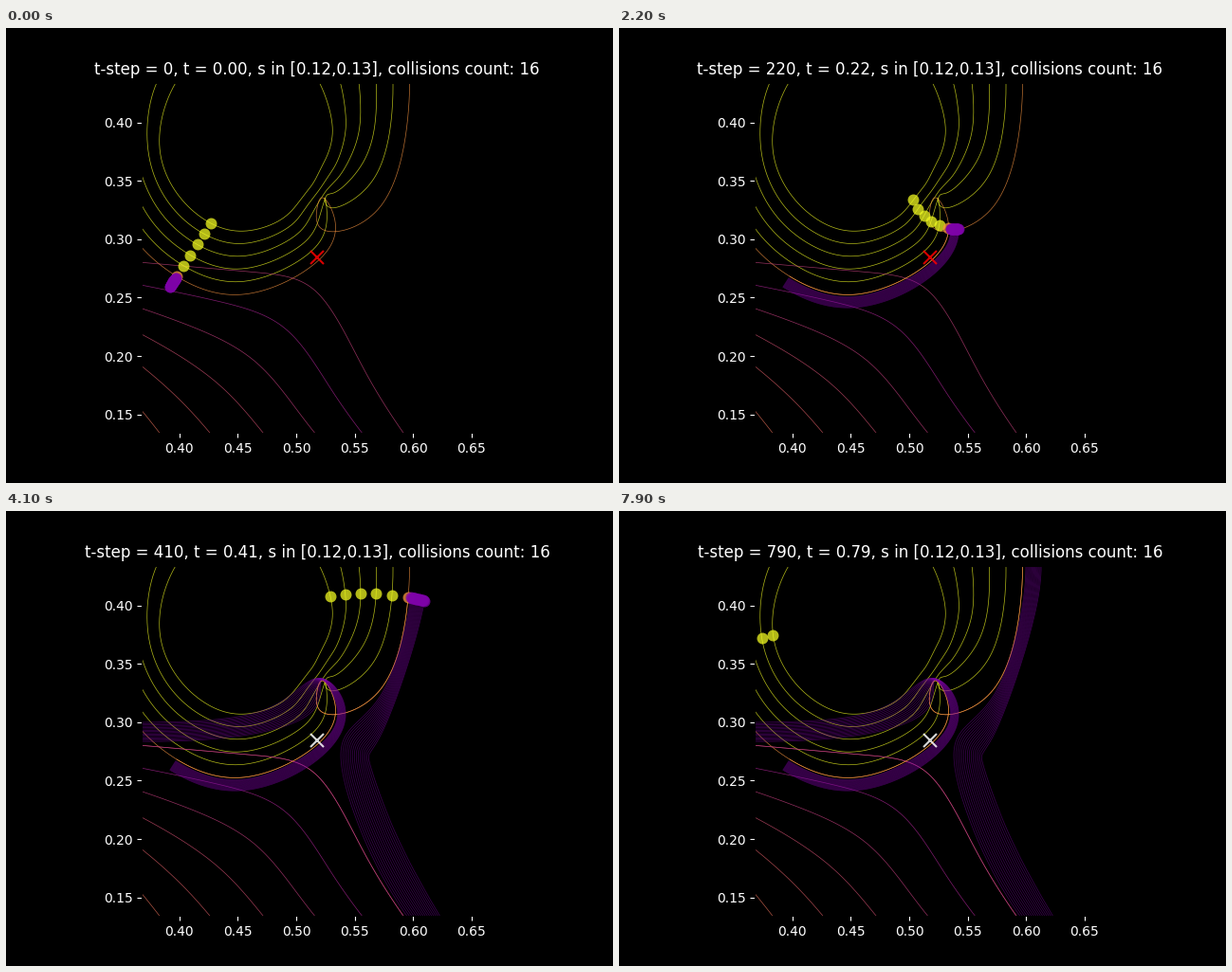
A matplotlib script for the animation above (8 s loop, 640 by 480 pixels).

```python
import numpy as np
import matplotlib.pyplot as plt
from matplotlib.animation import FuncAnimation

plt.style.use("dark_background")
plt.rcParams.update({"font.family": "DejaVu Sans", "axes.edgecolor": "black"})

FRAMES, INTERVAL = 80, 100
X0, Y0, SPAN = 0.36788, 0.1341, 0.3
LEFT, BOTTOM, SCALE = 143.2, 427.2, 1232  # axes box in pixels
STEP = 0.02    # seconds between path samples
PERIOD = 9.6   # time of one turn on the inner rings
MEET = 3.2     # time of the encounter
ALPHA = 0.75
plasma = plt.get_cmap("plasma")

# Poses by time: positions in pixels of members k = 0, 2.5 and 5.
RINGS = {
    -3.6: ((198, 30), (160, 5), (120, -30)),
    -2.8: ((174, 67), (137, 49), (110, 30)),
    -1.7: ((162.5, 131), (133, 138), (104, 140)),
    0.0: ((216, 206), (198, 234), (180, 262)),
    0.8: ((254, 214), (252, 247), (250, 281)),
    1.6: ((293, 200), (308, 224), (325, 249)),
    2.3: ((313, 178), (327, 197), (347, 204)),
    2.8: ((326, 160), (337, 176), (333, 179)),
    3.05: ((332, 148), (342, 171), (328, 190)),
    3.3: ((338, 136), (352, 163), (333, 212)),
    3.7: ((344, 114), (374, 129), (395, 188)),
    4.1: ((342, 90), (382, 87), (424, 91)),
    4.5: ((333, 63), (380, 45), (424, 20)),
    5.0: ((316, 33), (372, 10), (420, -60)),
}
PARTNERS = {
    2.2: ((300, 610), (382, 523), (458, 480)),
    2.8: ((212, 495), (297, 425), (379, 363)),
    3.2: ((150, 412), (244, 365), (329, 280)),
    3.6: ((85, 340), (168, 320), (255, 257)),
    4.0: ((20, 280), (70, 280), (128, 246)),
    4.4: ((-50, 220), (-30, 245), (10, 236)),
}

fig = plt.figure(figsize=(6.4, 4.8), dpi=100, facecolor="black")
ax = fig.add_subplot(facecolor="black")
ax.set_aspect("equal")
ax.set_xlim(X0, X0 + SPAN)
ax.set_ylim(Y0, Y0 + SPAN)
ticks = np.arange(0.15, 0.66, 0.05)
ax.set_xticks(ticks[5:])
ax.set_yticks(ticks[:6])
title = ax.set_title("", fontsize=12, color="white")


def member(poses, k):
    """Quadratic in k through the three given members."""
    weights = [(k - 2.5) * (k - 5) / 12.5, k * (5 - k) / 6.25, k * (k - 2.5) / 12.5]
    return {t: np.dot(weights, pose) for t, pose in poses.items()}


def swap(before, after, point):
    """Follow one path, bounce at the meeting point, leave on the other."""
    knots = {t: p for t, p in before.items() if t < MEET - 0.3}
    knots[MEET] = point
    knots.update((t, p) for t, p in after.items() if t > MEET + 0.45)
    return knots


def spline(knots):
    """Natural cubic spline in time, sampled every STEP seconds."""
    t, p = np.array(list(knots)), np.array(list(knots.values()), float)
    n, h = len(t), np.diff(t)
    slope = np.diff(p, axis=0) / h[:, None]
    mat, rhs = np.eye(n), np.zeros((n, 2))
    for i in range(1, n - 1):
        mat[i, i - 1:i + 2] = h[i - 1], 2 * (h[i - 1] + h[i]), h[i]
        rhs[i] = 6 * (slope[i] - slope[i - 1])
    m = np.linalg.solve(mat, rhs)
    fine = t[0] + STEP * np.arange(round((t[-1] - t[0]) / STEP) + 1)
    j = np.clip(np.searchsorted(t, fine, side="right") - 1, 0, n - 2)
    d, hj = (fine - t[j])[:, None], h[j][:, None]
    first = slope[j] - hj * (2 * m[j] + m[j + 1]) / 6
    return p[j] + d * (first + d * (m[j] / 2 + d * (m[j + 1] - m[j]) / (6 * hj)))


class Body:
    def __init__(self, knots, tone, track=True, trail=None, orbits=False, z=3):
        self.start = min(knots)
        x, y = spline(knots).T
        self.x, self.y = X0 + (x - LEFT) / SCALE, Y0 + (BOTTOM - y) / SCALE
        self.orbits = orbits
        color = plasma(tone)
        if track:
            ax.plot(self.x, self.y, color=color, lw=0.5, alpha=ALPHA, zorder=2)
        self.trail = None
        if trail:
            self.trail, = ax.plot([], [], color=color, lw=0.5, alpha=trail, zorder=2.1)
        self.dot, = ax.plot([], [], "o", ms=8.6, mew=0, color=color,
                            alpha=ALPHA, zorder=z)

    def index(self, t):
        return round((t - self.start) / STEP)

    def move(self, t):
        if self.trail:
            part = slice(max(0, self.index(0)), max(0, self.index(t) + 1))
            self.trail.set_data(self.x[part], self.y[part])
        i = self.index(t)
        if self.orbits and i >= len(self.x):
            i = self.index(t - PERIOD)
        shown = 0 <= i < len(self.x)
        self.dot.set_data([self.x[i]] if shown else [], [self.y[i]] if shown else [])


bodies = []
for k, tone in enumerate([0.64, 0.58, 0.53, 0.47, 0.38, 0.48]):
    trail = ALPHA if k == 5 else None
    bodies.append(Body(member(RINGS, k), 0.75 if k == 5 else 1.0,
                       trail=trail, orbits=k < 2))
    bodies.append(Body(member(PARTNERS, k), tone, trail=trail))

# Pairs that collide and trade paths
center = np.array([338, 234])
for u in np.linspace(0, 1, 16):
    ring, partner = (member(poses, 5.15 + 0.85 * u) for poses in (RINGS, PARTNERS))
    gap = np.array([15 + 31 * u, 23 + 11 * u])
    for knots in (swap(ring, partner, center - gap), swap(partner, ring, center + gap)):
        bodies.append(Body(knots, 0.25, track=False, trail=0.5, z=4))

cross, = ax.plot(X0 + SPAN / 2, Y0 + SPAN / 2, "x", ms=10, mew=1.5, alpha=0.85,
                 zorder=2.5)


def draw(frame):
    t = frame * INTERVAL / 1000
    title.set_text(f"t-step = {frame * 10}, t = {frame / 100:.2f}, "
                   "s in [0.12,0.13], collisions count: 16")
    cross.set_color("white" if t >= MEET else "red")
    for body in bodies:
        body.move(t)
    return []


anim = FuncAnimation(fig, draw, frames=FRAMES, interval=INTERVAL,
                     init_func=lambda: draw(0), repeat=True, repeat_delay=0)
plt.show()
```
